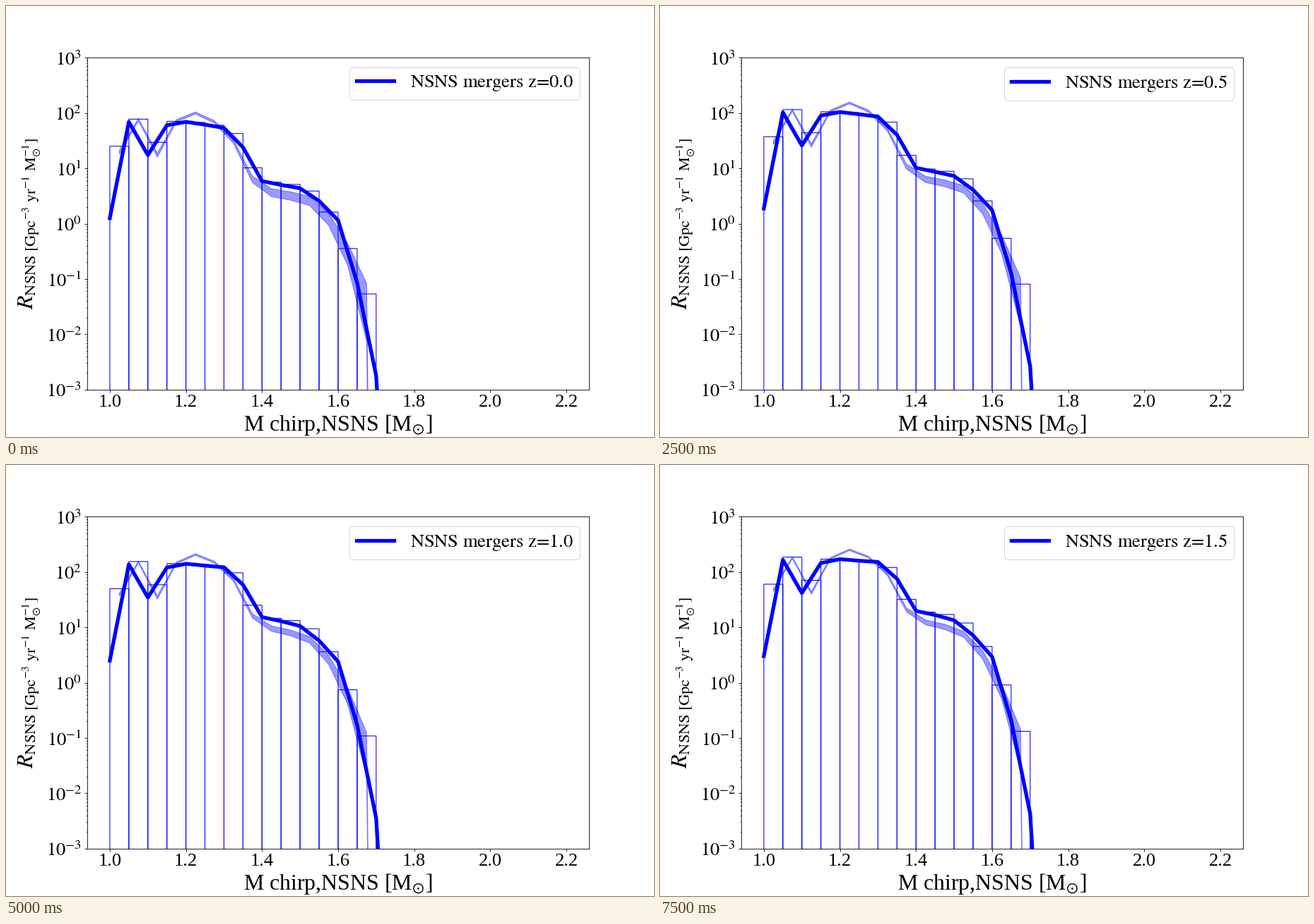
Write a matplotlib script that moves like this. It is 917 by 611 pixels and loops after 8 s.

```python
import numpy as np
import matplotlib.pyplot as plt
from matplotlib.animation import FuncAnimation
from matplotlib.patches import Polygon

W, H, DPI = 917, 611, 76.4
FRAMES, STEP_MS = 16, 500
Z_MAX = 1.5
BIN = 0.05
FLOOR = 1e-5

plt.rcParams.update({
    "font.family": "Liberation Serif",
    "mathtext.fontset": "stix",
    "font.size": 25,
    "axes.labelsize": 30,
})

edges = 1 + BIN * np.arange(16)
left, centers = edges[:14], edges[:14] + BIN / 2

# log10 of the merger rate per mass bin at z = 0
BARS = [1.40, 1.89, 1.47, 1.85, 1.83, 1.78, 1.63, 1.01, 0.75, 0.71, 0.59, 0.21, -0.45, -1.27]
LINE = [0.10, 1.84, 1.24, 1.78, 1.84, 1.79, 1.73, 1.38, 0.77, 0.70, 0.64, 0.41, 0.06, -1.07, -2.75, -8.4]
BAND = [1.29, 1.88, 1.24, 1.86, 2.00, 1.84, 1.48, 0.80, 0.56, 0.50, 0.41, 0.08, -0.55, -1.60]


def rate(base, mass, z):
    """Rates rise with z, slowing down, and fastest near 1.42 solar masses."""
    u = z / Z_MAX
    ease = u * (1 + 0.54 * (1 - u))
    growth = 0.38 + 0.15 * np.exp(-((mass - 1.42) / 0.14) ** 2)
    return 10 ** (np.array(base) + growth * ease)


def band_points(z):
    """Outline of the band, which widens where mergers are rare."""
    mid = rate(BAND, centers, z)
    spread = 10 ** (0.12 * mid ** -0.4)
    x = np.append(centers, centers[-1] + BIN)
    up, low = np.append(mid * spread, 1e-30), np.append(mid / spread, 1e-30)
    return np.column_stack([np.r_[x, x[::-1]], np.r_[up, low[::-1]]])


def legend_text(z):
    return rf"$\text{{NSNS mergers z={z:.1f}}}$"


# The tiny excess keeps the pixel size from rounding down
fig = plt.figure(figsize=((W + 1e-6) / DPI, (H + 1e-6) / DPI), dpi=DPI)
ax = fig.add_subplot()
ax.set_yscale("log")

band = ax.add_patch(Polygon(band_points(0), closed=True, facecolor="blue",
                            edgecolor="blue", alpha=0.4, lw=1))
bars = ax.bar(left, rate(BARS, left, 0) - FLOOR, BIN, bottom=FLOOR,
              align="edge", fill=False, edgecolor="blue", lw=1, snap=False)
line, = ax.plot(edges, rate(LINE, edges, 0), color="blue", lw=5,
                label=legend_text(0))

ax.set_xlim(0.94, 2.26)
ax.set_ylim(1e-3, 1e3)
xticks = 1 + 0.2 * np.arange(7)
ax.set_xticks(xticks, [f"{x:.1f}" for x in xticks])
powers = range(-3, 4)
ax.set_yticks([10.0 ** p for p in powers], [f"$10^{{{p}}}$" for p in powers])
ax.set_xlabel(r"M chirp,NSNS [M$_{\odot}$]")
ax.set_ylabel(r"$R_{\mathrm{NSNS\ [Gpc^{-3}\ yr^{-1}\ M_{\odot}^{-1}]}}$")
legend = ax.legend(loc="upper right", borderpad=0.36, handletextpad=0.86)
label = legend.get_texts()[0]


def draw(i):
    z = 0.1 * i
    for bar, r in zip(bars, rate(BARS, left, z)):
        bar.set_height(r - FLOOR)
    band.set_xy(band_points(z))
    line.set_ydata(rate(LINE, edges, z))
    label.set_text(legend_text(z))
    return [*bars, band, line, label]


anim = FuncAnimation(fig, draw, frames=FRAMES, interval=STEP_MS,
                     repeat=True, repeat_delay=0)
plt.show()
```
